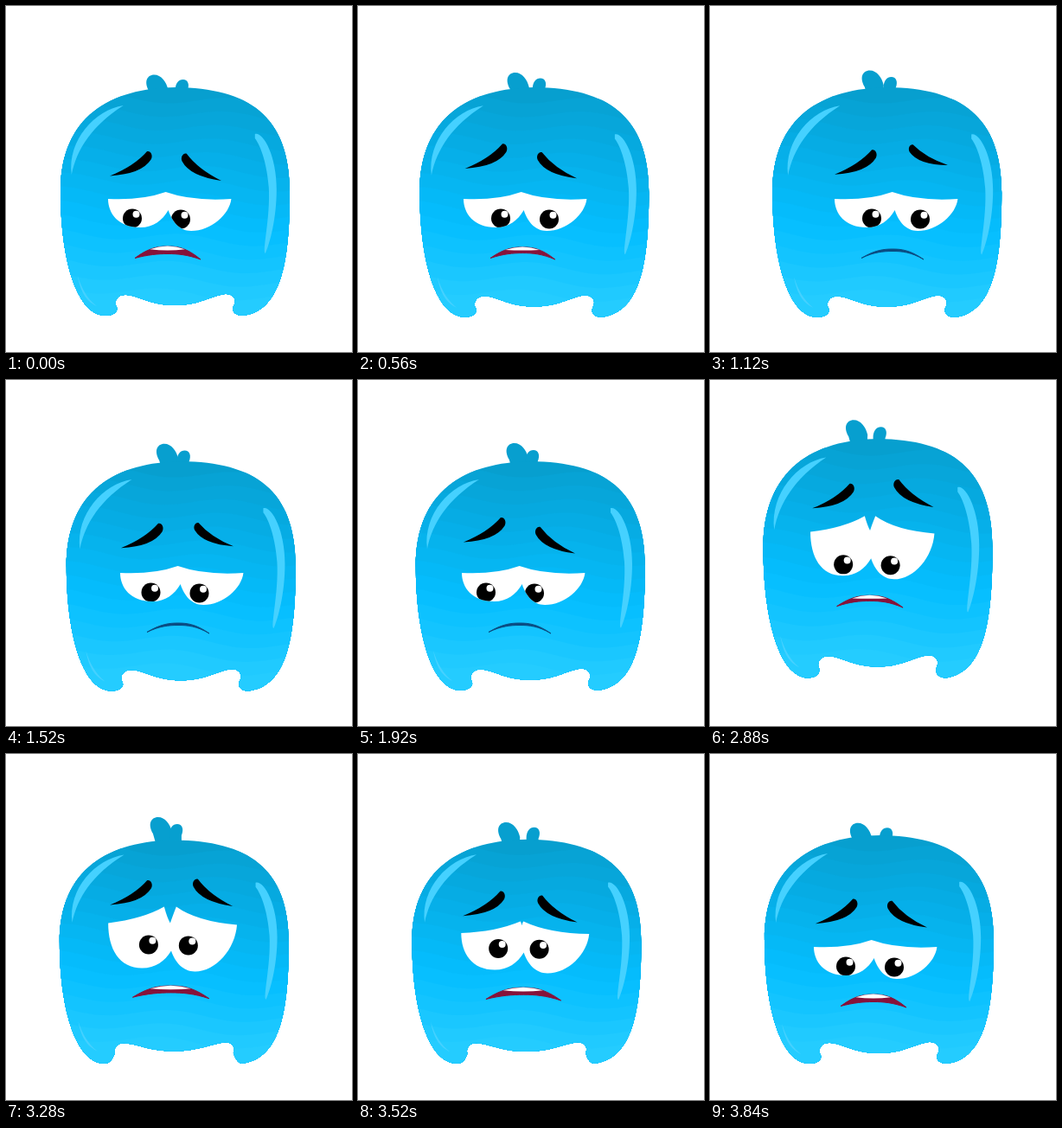
An HTML page with a canvas for the animation above (3920 ms loop, 400 px wide and 400 px high).

```html
<!DOCTYPE html>
<html lang="en">
<head>
<meta charset="utf-8">
<title>Sad blob</title>
<style>
  html, body { margin: 0; width: 100%; height: 100%; overflow: hidden; background: #fff; }
  canvas { display: block; width: 100vw; height: 100vh; }
</style>
</head>
<body>
<canvas id="stage" width="400" height="400"></canvas>
<script>
const LOOP = 3920, STEP = 80;
const ctx = document.getElementById('stage').getContext('2d');

const mix = (a, b, u) => a + (b - a) * u;
const smooth = u => u * u * (3 - 2 * u);
const rgb = (a, b, u) => `rgb(${a.map((v, i) => Math.round(mix(v, b[i], u)))})`;

// Eases between [time, value] points and wraps at the end of the loop.
function curve(t, ...keys) {
  let i = keys.length - 1;
  while (i >= 0 && keys[i][0] > t) i--;
  const wrap = (k, by) => [k[0] + by, k[1]];
  const a = keys[i] || wrap(keys[keys.length - 1], -LOOP);
  const b = keys[i + 1] || wrap(keys[0], LOOP);
  return mix(a[1], b[1], smooth((t - a[0]) / (b[0] - a[0])));
}

// The few motions that drive every part.
const mood = t => ({
  sway: curve(t, [0, -1], [760, 9], [2960, -2.5]),
  turn: curve(t, [0, 0], [560, 4], [1120, 26], [1920, 2], [2480, -3], [3840, 2]),
  look: curve(t, [0, 0], [560, 1], [1120, 1], [1920, 0], [2480, .1], [3280, 1.25], [3840, .6]),
  lift: curve(t, [2360, 0], [2660, -42], [3200, 0]),
  land: curve(t, [2720, 0], [3400, 1], [3800, 0]),
  open: curve(t, [2300, 0], [2580, .9], [3280, 1], [3760, 0]),
  perk: curve(t, [0, .2], [1120, .8], [1920, 1], [3280, 1], [3640, 0]),
  talk: curve(t, [0, 1], [560, .7], [1120, 0], [2200, 0], [3280, .9]),
  frown: Math.cos(6 * Math.PI * t / LOOP)
});

const shines = new Path2D('M136 115C103 120 71 155 76 195C82 165 100 138 136 115Z' +
  'M288 148C297 145 313 172 313 212C313 246 305 275 300 286C296 284 306 245 304 210C302 183 295 162 288 153Z' +
  'M83 312C87 334 95 342 105 347C95 339 88 328 83 312Z');
const bigLobe = new Path2D('M3 19C-3 9 0 0 9 0C17 0 23 8 25 17L24 40L9 40Z');
const smallLobe = new Path2D('M0 13C0 4 4 0 9 0C15 0 17 6 14 13L14 36L2 36Z');

// The feet curl inwards except while landing.
function outline(land) {
  const curl = 1 - land, belly = 346 - 3 * land;
  const p = new Path2D('M64 215C64 127 122 95 197 94C281 95 329 126 329 215C329 300 318 352 275 358');
  p.bezierCurveTo(271 - 7 * curl, 358, 267 - 6 * curl, 351, 265, 345);
  p.bezierCurveTo(268, 338, 262, 332, 254, 333);
  p.bezierCurveTo(238, 335, 225, belly, 196, belly);
  p.bezierCurveTo(168, belly, 155, 335, 140, 334);
  p.bezierCurveTo(131, 333, 126, 340, 128, 346);
  p.bezierCurveTo(125 + 7 * curl, 352, 122 + 5 * curl, 358, 116, 358);
  p.bezierCurveTo(80, 357, 64, 285, 64, 215);
  return p;
}

function fill(path, color) {
  ctx.fillStyle = color;
  ctx.fill(path);
}

function at(x, y, paint) {
  ctx.save();
  ctx.translate(x, y);
  paint();
  ctx.restore();
}

function clipped(path, paint) {
  ctx.save();
  ctx.clip(path);
  paint();
  ctx.restore();
}

function disc(x, y, r, color) {
  const p = new Path2D();
  p.arc(x, y, r, 0, 7);
  fill(p, color);
}

const TOP = [7, 159, 207], MIDDLE = [5, 190, 255], LOW = [36, 204, 255];
const shade = y => y < 255
  ? rgb(TOP, MIDDLE, Math.max(0, (y - 95) / 160))
  : rgb(MIDDLE, LOW, Math.min(1, (y - 255) / 80));

function bands() {
  ctx.fillStyle = shade(95);
  ctx.fillRect(50, 80, 300, 290);
  for (let y = 108; y < 345; y += 16) {
    const p = new Path2D();
    p.moveTo(50, 380);
    for (let x = 50; x <= 350; x += 6)
      p.lineTo(x, y + .05 * (x - 196) + 5 * Math.cos((x - 64) / 25 + y / 70));
    p.lineTo(350, 380);
    fill(p, shade(y + 8));
  }
}

function drawBody({ sway, turn, lift, land }) {
  const top = 94.5 + 6 * land + lift;
  const bottom = 358.3 + .2 * sway + lift / 2;
  at(196.5 + sway, top, () => {
    ctx.scale(1, (bottom - top) / 263.5);
    ctx.translate(-196.5, -94.5);
    clipped(outline(land), bands);
    at(.8 + .2 * turn + 2 * land, -4 * land, () => fill(shines, '#45d1ff'));
  });
}

function drawTuft({ sway, lift, perk }) {
  at(162 + sway + 7 * perk + .35 * lift, 81 - 8 * perk + lift, () => fill(bigLobe, shade(95)));
  at(198 + sway - 7 * perk, 86 - 5 * perk + lift, () => fill(smallLobe, shade(95)));
}

function drawEyes({ turn, look, land, open }) {
  const x = 118 + turn, s = 1.01 + .05 * land, X = v => x + v * s;
  const bottom = 256 - 7 * land - 2 * open, low = bottom - 20;
  const corner = bottom - 33 - 19 * open, peak = bottom - 41 - 30 * open;
  const gap = 7 * open ** 2, dip = peak + 19 * open ** 2, mid = X(66) + 2 * open;
  const p = new Path2D();
  p.moveTo(x, corner);
  p.quadraticCurveTo(X(38), corner + 2 - 7 * open, mid - gap, peak);
  p.quadraticCurveTo(mid - gap / 2, dip - 6 * open, mid, dip);
  p.quadraticCurveTo(mid + gap / 3, dip - 7 * open, mid + gap, peak);
  p.quadraticCurveTo(X(97), corner + 3 - 5 * open, X(141), corner + 2 * open);
  p.bezierCurveTo(X(139), low + 5 - 7 * open, X(118), bottom + 4, X(95), bottom + 4);
  p.bezierCurveTo(X(82), bottom + 4, X(73), bottom - 7, X(69), low);
  p.bezierCurveTo(X(62), bottom - 8, X(52), bottom, X(37), bottom);
  p.bezierCurveTo(X(12), bottom, x, low + 4 - 6 * open, x, corner);
  fill(p, '#fff');

  const px = x + 28 + 15 * look, py = 245.5 - 25 * land - 2 * open;
  clipped(p, () => {
    for (const dx of [0, 56 - 11 * land]) {
      disc(px + dx, py + dx / 56, 11, '#000');
      disc(px + dx + 4.5, py + dx / 56 - 4.8, 4, '#fff');
    }
  });
}

// A tapered stroke from the thin tip to the blunt head; side mirrors it.
function drawBrow(x, y, dx, dy, side) {
  const pt = (u, v) => [x + u * dx - side * v * dy, y + u * dy + side * v * dx];
  const p = new Path2D();
  p.moveTo(x, y);
  p.quadraticCurveTo(...pt(.55, .1), ...pt(.95, -.02));
  p.bezierCurveTo(...pt(1.02, 0), ...pt(1.02, .12), ...pt(.93, .17));
  p.quadraticCurveTo(...pt(.6, .33), x, y);
  fill(p, '#000');
}

function drawBrows({ turn, lift, open, frown }) {
  const up = open ** 2, aside = turn / 26, y = .25 * lift;
  drawBrow(120 + turn - 2 * aside, 192 + 4.5 * frown - 13 * up + y, 46, -29, 1);
  drawBrow(249 + turn + 13 * up, 202 - 18 * aside - 26 * up + y, -43, -32 + 8 * aside, -1);
}

function drawMouth({ turn, land, open, talk }) {
  const left = 149 + turn - 3 * land, w = 72 + 4 * talk + 14 * land;
  const right = left + w, mid = left + w / 2;
  const y = 292 - 9 * land - 2 * open, top = y - 11 - 3 * talk, low = top + 2.5 + 6 * talk;
  const color = rgb([10, 76, 130], [134, 18, 58], Math.min(1, 6 * talk));
  const p = new Path2D();
  p.moveTo(left, y - .5);
  p.bezierCurveTo(left + w * .22, top + 1, mid - w * .14, top, mid, top);
  p.bezierCurveTo(mid + w * .14, top, right - w * .22, top + 1, right, y + 1);
  p.bezierCurveTo(right - w * .2, low + 1, mid + w * .15, low, mid, low);
  p.bezierCurveTo(mid - w * .15, low, left + w * .2, low + 1, left, y - .5);
  fill(p, color);
  ctx.strokeStyle = color;
  ctx.lineJoin = 'round';
  ctx.stroke(p);

  const teeth = new Path2D();
  teeth.moveTo(mid - w * .27, top + 3.2);
  teeth.quadraticCurveTo(mid, top - 4, mid + w * .26, top + 3.2);
  teeth.quadraticCurveTo(mid, top + 6 * talk, mid - w * .27, top + 3.2);
  if (talk > .25) fill(teeth, '#fff');
}

function draw(t) {
  const m = mood(t);
  ctx.clearRect(0, 0, 400, 400);
  drawTuft(m);
  drawBody(m);
  at(0, m.lift, () => {
    drawEyes(m);
    drawBrows(m);
    drawMouth(m);
  });
}

const start = performance.now();
function tick() {
  const t = Math.max(0, performance.now() - start) % LOOP;
  draw(Math.floor(t / STEP) * STEP);
  requestAnimationFrame(tick);
}
tick();
</script>
</body>
</html>
```
